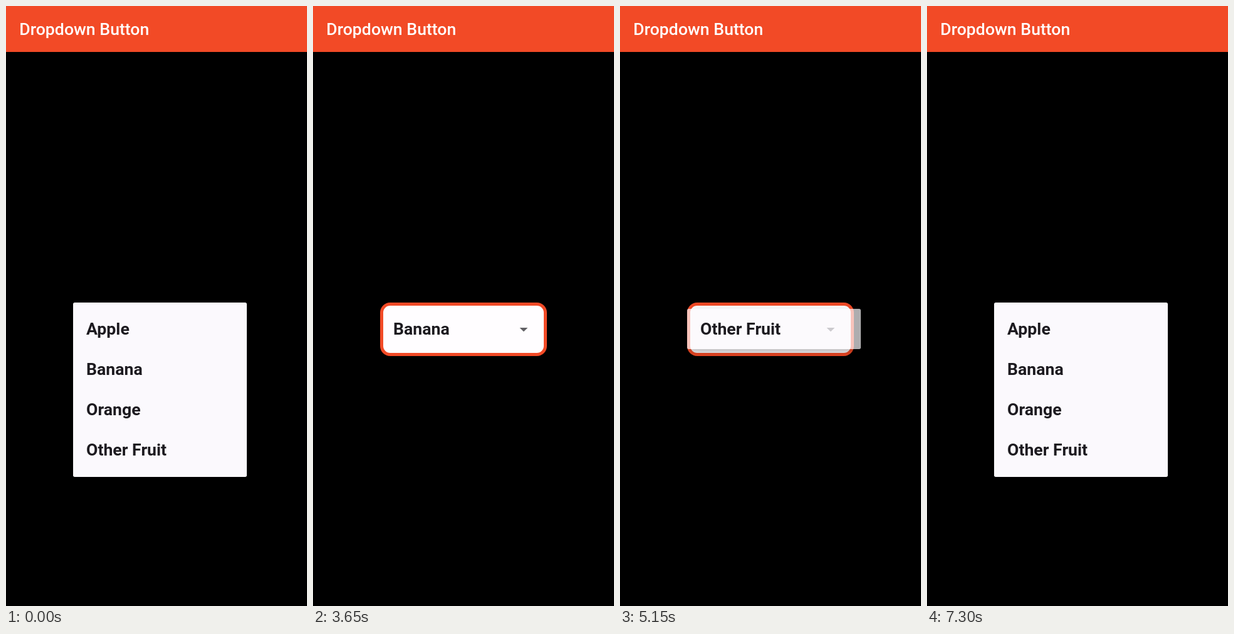
Recreate the animation shown at these times as an HTML page. Size 480 by 953 pixels, loop 8000 ms.

```html
<!DOCTYPE html>
<html lang="en">
<head>
<meta charset="utf-8">
<title>Dropdown Button</title>
<style>
  html, body { margin: 0; width: 100%; height: 100%; overflow: hidden; background: #000; }
  body { position: relative; font: 700 26.667px/65px Roboto, sans-serif; color: #1d1b20; }
  header {
    height: 73px; padding-left: 21.33px; background: #f24a26;
    color: #fff; font-weight: 500; line-height: 74px;
  }
  .button, .menu, .panel, .item, .splash { position: absolute; box-sizing: border-box; }
  .button {
    left: 106.67px; top: 470.67px; width: 266.67px; height: 85.33px;
    border: 5.33px solid #f24a26; border-radius: 16px; background: #fffdff;
  }
  .value, .arrow { position: absolute; }
  .value { left: 128px; top: 481.33px; white-space: nowrap; }
  .arrow {
    left: 329.33px; top: 510.67px; width: 13.33px; height: 6.67px;
    background: #616064; clip-path: polygon(0 0, 100% 0, 50% 100%);
  }
  .menu { left: 106.67px; width: 277.33px; height: 277.33px; }
  .panel {
    width: 100%; border-radius: 2.67px; background: #fbf9fd;
    box-shadow: 0 6.7px 8px -4px #0003, 0 10.7px 16px 1.3px #00000024, 0 4px 22px 2.7px #0000001f;
  }
  .item { width: 100%; height: 64px; overflow: hidden; }
  .item span { position: absolute; left: 21.33px; white-space: nowrap; }
  .splash { border-radius: 50%; }
</style>
</head>
<body>
<header>Dropdown Button</header>
<div class="button"></div>
<div class="value">Apple</div>
<div class="arrow"></div>
<div class="menu"><div class="panel"></div></div>
<script>
const LOOP = 8000, OPEN_MS = 300;
const ROW = 64, PAD = 10.667, HEIGHT = 4 * ROW + 2 * PAD, ROW_TOP = 481.333;
const TAP = { x: 135, y: 36.5 }, REACH = 145;
const fruits = ['Apple', 'Banana', 'Orange', 'Other Fruit'];

// Each visit to the menu: opened on `sel`, pressed and released on `pick`.
const visits = [
  { open: -1000, sel: 0, pick: 1, press: 2697, up: 2865 },
  { open: 3666, sel: 1, pick: 3, press: 4480, up: 4535 },
  { open: 5099, sel: 3, pick: 0, press: 6218, up: 6262 },
  { open: 7000, sel: 0, pick: 0, press: Infinity, up: Infinity }
];

const value = document.querySelector('.value');
const menu = document.querySelector('.menu');
const panel = document.querySelector('.panel');
const items = fruits.map((name, i) => {
  const row = document.createElement('div');
  const splash = document.createElement('div');
  const label = document.createElement('span');
  row.className = 'item';
  row.style.top = PAD + i * ROW + 'px';
  splash.className = 'splash';
  label.textContent = name;
  row.append(splash, label);
  menu.append(row);
  return { row, splash };
});

const part = (x, a, b) => Math.min(1, Math.max(0, (x - a) / (b - a)));

function drawInk({ row, splash }, visit, picked, t) {
  const on = picked && t >= visit.press;
  splash.style.display = on ? 'block' : 'none';
  row.style.backgroundColor = 'transparent';
  if (!on) return;
  const held = Math.min(t, visit.up) - visit.press;
  const after = Math.max(0, t - visit.up);
  const glow = Math.max(0, Math.min(1, held / 200) - after / 200);
  const r = REACH * Math.min(1, held / 1000 + after / 108);
  row.style.backgroundColor = `rgba(188,188,188,${0.4 * glow})`;
  splash.style.left = TAP.x - r + 'px';
  splash.style.top = TAP.y - r + 'px';
  splash.style.width = splash.style.height = 2 * r + 'px';
  splash.style.backgroundColor = `rgba(200,200,200,${0.4 * (1 - part(after, 0, 200))})`;
}

function draw(t) {
  const visit = visits.filter(v => v.open <= t).pop();
  const closing = t >= visit.up;
  const p = closing ? 1 - part(t, visit.up, visit.up + OPEN_MS)
                    : part(t, visit.open, visit.open + OPEN_MS);
  const fade = closing ? part(p, 0.75, 1) : part(p, 0, 0.25);
  const grow = closing ? 1 : part(p, 0.25, 0.5);
  const start = PAD + visit.sel * ROW;
  const top = start * (1 - grow);
  const bottom = start + ROW + (HEIGHT - start - ROW) * grow;

  value.textContent = fruits[closing ? visit.pick : visit.sel];
  menu.style.display = fade > 0 ? 'block' : 'none';
  menu.style.opacity = fade;
  menu.style.top = ROW_TOP - start + 'px';
  panel.style.top = top + 'px';
  panel.style.height = bottom - top + 'px';

  const unit = 0.5 / (fruits.length + 1.5);
  items.forEach((item, i) => {
    const from = 0.5 + (i + 1) * unit;
    item.row.style.opacity = i === visit.sel ? 1 : part(p, from, from + 1.5 * unit);
    drawInk(item, visit, i === visit.pick, t);
  });
}

const begin = performance.now();
function tick() {
  draw((performance.now() - begin) % LOOP);
  requestAnimationFrame(tick);
}
tick();
</script>
</body>
</html>
```
